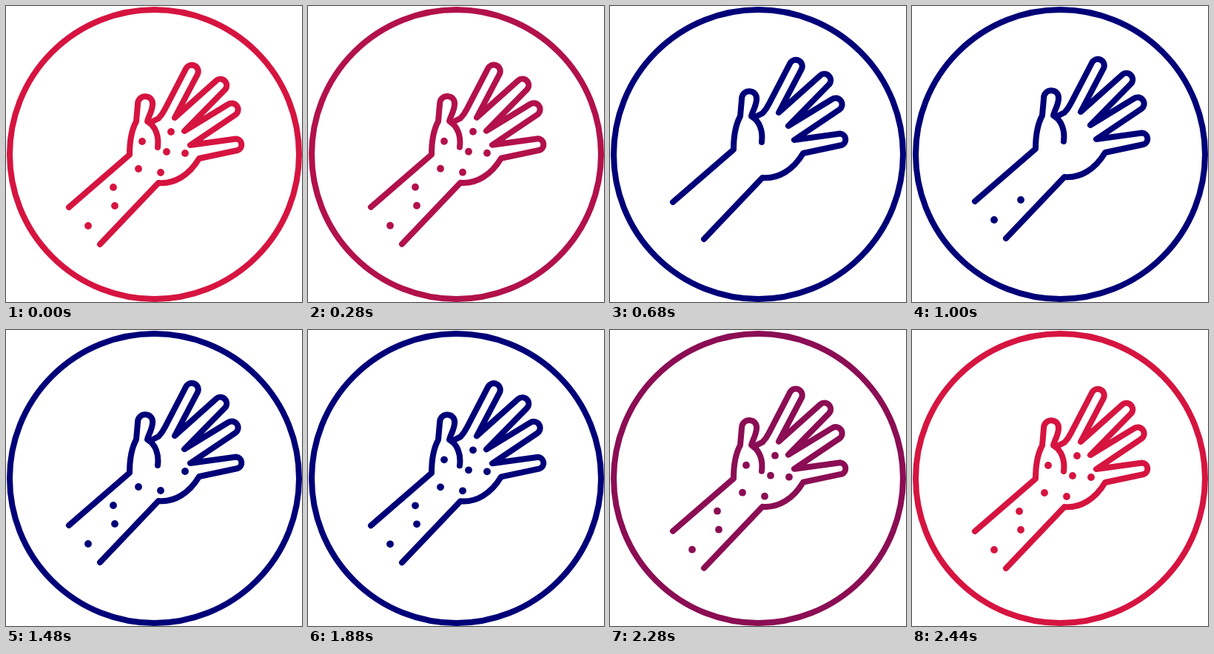
An HTML page that plays this animation: 400x400 px, repeating every 2.64 s.

```html
<!DOCTYPE html>
<html lang="en">
<head>
<meta charset="utf-8">
<title>Hand with spots</title>
<style>
  html, body { margin: 0; width: 100%; height: 100%; overflow: hidden; background: #fff; }
  svg { display: block; width: 100%; height: 100%; color: rgb(214, 20, 64); }
  .line { fill: none; stroke: currentColor; stroke-width: 8; stroke-linecap: round; stroke-linejoin: round; }
  .dots { fill: currentColor; }
</style>
</head>
<body>
<svg viewBox="0 0 400 400">
  <circle class="line" cx="200.5" cy="200.5" r="195.5"/>
  <g id="hand">
    <path class="line" d="M85 272 L167 201 C167 185 170 167 176 156 L178 133
      C178 118 200 119 198 134 C197 144 192 150 191 156 C202 162 207 176 205 191"/>
    <path class="line" d="M194 158 L206 152 Q211 147 215 139
      L243 85 A8.7 8.7 0 0 1 259 92 L228 151
      L284 101 A8.5 8.5 0 0 1 296 113 L241 169
      L300 133 A8.6 8.6 0 0 1 310 147 L249 188
      L311 179.5 A8 8 0 0 1 313 195 L261 206
      C248 228 228 241 206 239 L127 322"/>
    <g id="dots" class="dots"></g>
  </g>
</svg>
<script>
const LOOP = 2640, TICK = 40, LIFT = 8;
const RED = [214, 20, 64], NAVY = [0, 0, 120];
const FIRST_DOT = 880, DOT_GAP = 120;

// Spots in order of return, from the wrist upwards
const spots = [
  [111, 297], [147, 270], [145, 245], [209, 225], [179, 220],
  [242, 199], [217, 197], [184, 183], [223, 170]
];

const svg = document.querySelector('svg');
const hand = document.getElementById('hand');
const dotGroup = document.getElementById('dots');

const dots = spots.map(([x, y]) => {
  const dot = document.createElementNS('http://www.w3.org/2000/svg', 'circle');
  dot.setAttribute('cx', x);
  dot.setAttribute('cy', y);
  dot.setAttribute('r', 4.9);
  return dotGroup.appendChild(dot);
});

const ramp = (t, from, to) => Math.min(1, Math.max(0, (t - from) / (to - from)));
const ease = p => p < 0.5 ? 2 * p * p : 1 - 2 * (1 - p) * (1 - p);

function draw(t) {
  const lift = ease(ramp(t, 200, 840)) - ease(ramp(t, 1800, 2360));
  const cool = ramp(t, 200, 670) - ramp(t, 1985, 2440);
  const color = RED.map((c, i) => Math.round(c + (NAVY[i] - c) * cool));

  svg.style.color = `rgb(${color})`;
  hand.setAttribute('transform', `translate(0 ${-LIFT * lift})`);
  dots.forEach((dot, i) => {
    const back = t >= FIRST_DOT + i * DOT_GAP;
    dot.setAttribute('opacity', back ? 1 : 1 - ramp(t, 440, 680));
  });
}

const start = performance.now();
function frame() {
  const t = (performance.now() - start) % LOOP;
  draw(Math.floor(t / TICK) * TICK);
  requestAnimationFrame(frame);
}
frame();
</script>
</body>
</html>
```
